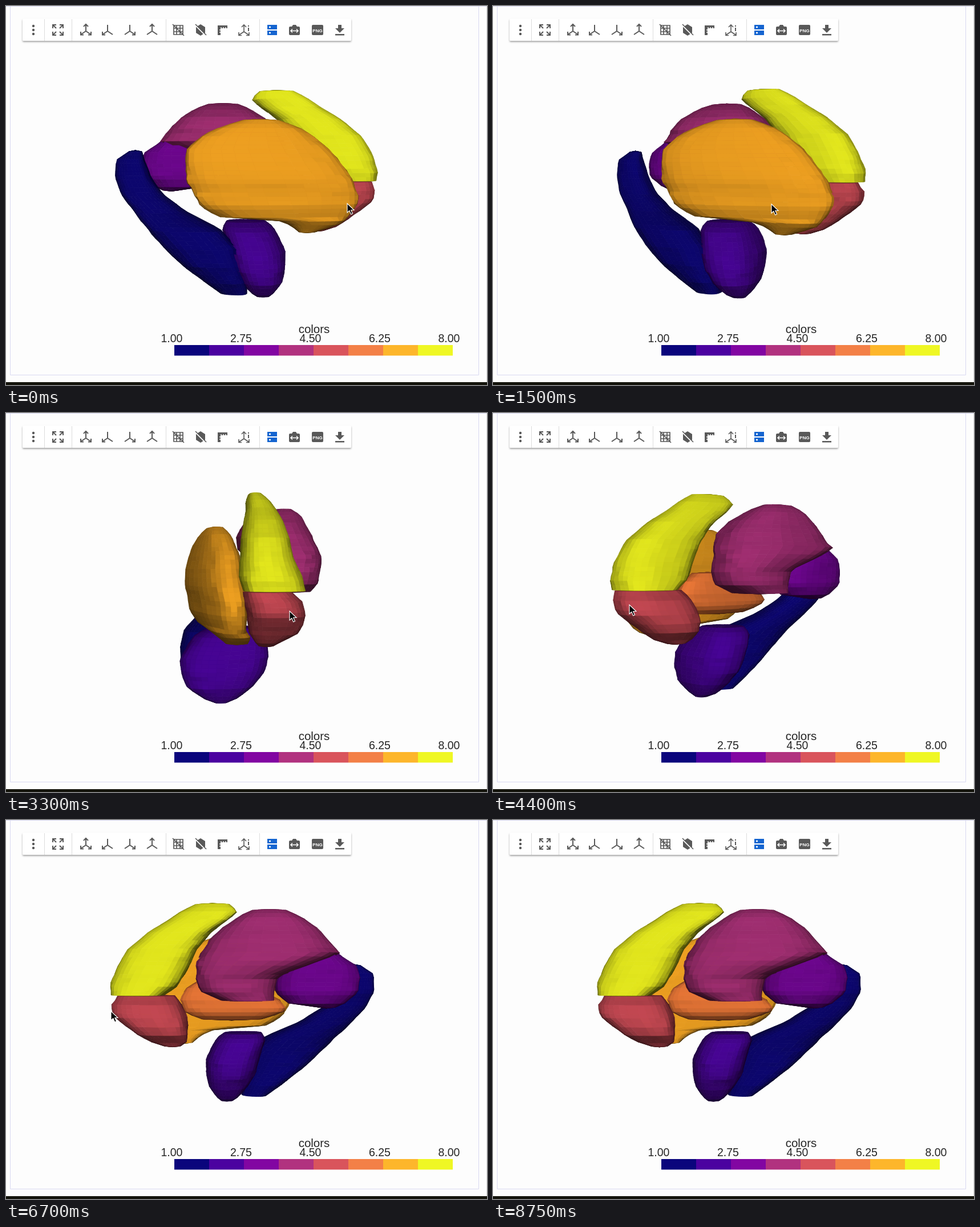
An HTML page with a canvas that plays this animation: 843x664 px, repeating every 8.8 s.

```html
<!DOCTYPE html>
<html lang="en">
<head>
<meta charset="utf-8">
<title>Rotating surface model</title>
<style>
html, body { margin: 0; width: 100%; height: 100%; overflow: hidden; background: #fdfdfd; }
svg, canvas { position: absolute; left: 0; top: 0; }
.label { font: 19.5px "Liberation Sans", Arial, sans-serif; fill: #262626; text-anchor: middle; }
.icon { fill: none; stroke: #595959; stroke-width: 2; }
.solid { fill: #595959; stroke: none; }
</style>
</head>
<body>
<svg width="843" height="664" viewBox="0 0 843 664">
  <defs>
    <filter id="shadow" x="-5%" y="-30%" width="110%" height="170%">
      <feDropShadow dx="0" dy="2" stdDeviation="1.5" flood-color="#000" flood-opacity=".35"/>
    </filter>
    <path id="axes" d="M0 2V-9M0 2L-9 8M0 2L9 8"/>
    <path id="up" d="M-4 -6L0 -10L4 -6"/>
    <path id="left" d="M-9 3V8.5H-4"/>
    <path id="right" d="M9 3V8.5H4"/>
  </defs>
  <path d="M7.5 0V646.5H828.5V0M0 .5H843" fill="none" stroke="#d9d9f2"/>
  <path d="M842.5 0V659" stroke="#e4e4e4"/>
  <rect y="659" width="843" height="5" fill="#14140c"/>

  <rect x="29" y="22" width="576" height="39" rx="2" fill="#fff" filter="url(#shadow)"/>
  <path d="M67.5 23V61M115.5 23V61M280.5 23V61M444.5 23V61" stroke="#dcdcdc"/>
  <g class="icon">
    <g class="solid" transform="translate(48 42)">
      <circle cy="-7" r="2.2"/><circle r="2.2"/><circle cy="7" r="2.2"/>
    </g>
    <path transform="translate(91 42)" d="M-9 -3V-9H-3M3 -9H9V-3M9 3V9H3M-3 9H-9V3M-8 -8L-3 -3M8 -8L3 -3M8 8L3 3M-8 8L-3 3"/>
    <g transform="translate(140 42)"><use href="#axes"/><use href="#up"/><use href="#left"/><use href="#right"/></g>
    <g transform="translate(178 42)"><use href="#axes"/><use href="#left"/></g>
    <g transform="translate(217 42)"><use href="#axes"/><use href="#right"/></g>
    <g transform="translate(256 42)"><use href="#axes"/><use href="#up"/></g>
    <path transform="translate(302 42)" stroke-width="1.7" d="M-8 -8H8V8H-8ZM-8 -3H8M-8 3H8M-3 -8V8M3 -8V8M-10 -10L10 10"/>
    <g transform="translate(341 42)">
      <path class="solid" d="M0 -10L8 -5V5L0 10L-8 5V-5Z"/>
      <path d="M-9 -8L9 10" stroke="#fff"/><path d="M-9 -10L10 9" stroke-width="1.6"/>
    </g>
    <g transform="translate(379 42)">
      <path class="solid" d="M-8 -8H9V-3H-3V9H-8Z"/>
      <path stroke="#fff" stroke-width="1.4" d="M-2 -5V-2M2 -5V-2M6 -5V-2M-5 0H-2M-5 4H-2"/>
    </g>
    <g transform="translate(417 43)" stroke-width="1.6">
      <use href="#axes"/><use href="#up"/><use href="#left"/><use href="#right"/>
      <path d="M8 -5V1M8 -9V-7" stroke-width="2"/>
    </g>
    <g transform="translate(466 42)">
      <path d="M-8 -9H9V-1H-8ZM-8 1H9V9H-8Z" fill="#1565d0" stroke="none"/>
      <path d="M-5 -5H-2M-5 5H-2" stroke="#fff" stroke-width="2.6"/>
    </g>
    <g transform="translate(505 42)">
      <path class="solid" d="M-7 -6H-4L-2 -9H3L5 -6H8Q10 -6 10 -4V7Q10 9 8 9H-7Q-9 9 -9 7V-4Q-9 -6 -7 -6Z"/>
      <path d="M-5 1.5H6M-3 -1.5L-6 1.5L-3 4.5M4 -1.5L7 1.5L4 4.5" stroke="#fff" stroke-width="1.5"/>
    </g>
    <g class="solid">
      <rect x="536" y="33" width="20" height="18" rx="2"/>
      <text x="546" y="45.5" fill="#fff" text-anchor="middle" font-family="Liberation Sans, sans-serif" font-weight="bold" font-size="8">PNG</text>
    </g>
    <path class="solid" transform="translate(585 42)" d="M-3 -9H3V-3H8L0 5L-8 -3H-3ZM-8 7H8V9.5H-8Z"/>
  </g>

  <g id="legend"><text class="label" x="540" y="573" style="font-size:20.5px">colors</text></g>
</svg>
<canvas id="view" width="843" height="664"></canvas>
<svg id="cursor" width="16" height="24" viewBox="-1 -1 16 24">
  <path d="M0 0V16L3.8 12.5L6.7 19L9.5 17.7L6.7 11.5H12Z" fill="#000" stroke="#fff" stroke-width="1.1"/>
</svg>
<script>
const LOOP = 8800, STEP = 50;
const CX = 418, CY = 323, EYE = 1207, TILT = 0.04;
const RING = 34, SLICE = 7;
const ctx = document.getElementById('view').getContext('2d');
const cursor = document.getElementById('cursor');

// time, turn in degrees, pointer x, pointer y
const track = [
  [0, 0, 598, 346], [1500, 21, 488, 347], [2300, 62, 250, 347], [2700, 62, 599, 347],
  [3300, 80, 497, 347], [4400, 142, 239, 336], [4550, 147, 215, 335], [4900, 147, 319, 335],
  [5350, 161, 258, 335], [6050, 179, 184, 335], [6900, 179, 184, 335], [7200, 178, 188, 335],
  [7500, 178, -30, 335], [8800, 178, -30, 335]
];

const mix = (a, b, f) => a.map((v, i) => v + (b[i] - v) * f);

function sample(rows, at) {
  let i = 0;
  while (i < rows.length - 2 && rows[i + 1][0] <= at) i++;
  const a = rows[i], b = rows[i + 1];
  return mix(a, b, (at - a[0]) / (b[0] - a[0]));
}

function noise(a, b, c) {
  const v = Math.sin(a * 12.99 + b * 78.23 + c * 37.7) * 43758.5;
  return v - Math.floor(v) - 0.5;
}

const round = v => Math.sign(v) * Math.abs(v) ** 0.82;
const parts = [];

// Each row is one level of the solid: y, x from, x to, z from, z to.
function solid(color, skew, rows) {
  const seed = parts.length + 1;
  const top = rows[0][0], span = rows[rows.length - 1][0] - top;
  const n = Math.round(span / SLICE);
  const rings = [];
  const addRing = ([y, x0, x1, z0, z1], j, size) => {
    const ring = [];
    for (let i = 0; i < RING; i++) {
      const t = i / RING * 2 * Math.PI;
      const r = size * (1 + 0.035 * noise(i >> 1, j >> 1, seed) + 0.012 * noise(i, j, seed));
      const x = (x1 - x0) / 2 * round(Math.cos(t)) * r;
      const z = (z1 - z0) / 2 * round(Math.sin(t)) * r;
      ring.push([(x0 + x1) / 2 + x, y, (z0 + z1) / 2 + z + skew * x]);
    }
    rings.push(ring);
  };
  const end = rows[rows.length - 1];
  addRing(rows[0].map((v, i) => i ? v : v - 2), 0, 0);
  for (let j = 0; j <= n; j++) addRing(sample(rows, top + span * j / n), j, 1);
  addRing(end.map((v, i) => i ? v : v + 2), n, 0);
  parts.push({ color, rings });
}

solid([12, 6, 108], 0.2, [
  [-68, -203, -180, -12, 8], [-53, -225, -175, -20, 20], [-23, -226, -163, -22, 28],
  [6, -214, -141, -12, 42], [34, -190, -100, 0, 62], [62, -164, -40, 15, 95],
  [90, -138, -12, 25, 105], [118, -108, -5, 28, 105], [147, -70, 3, 30, 95], [168, -41, 4, 38, 80]
]);
solid([70, 4, 146], 0, [
  [52, -32, 36, -15, 60], [62, -38, 50, -30, 85], [80, -32, 60, -36, 100], [100, -27, 68, -36, 113],
  [125, -20, 68, -30, 113], [150, -6, 63, -8, 102], [168, 10, 50, 15, 78], [176, 20, 42, 36, 57]
]);
solid([106, 6, 138], 0, [
  [-95, -145, -100, -90, -30], [-82, -160, -80, -100, -25], [-66, -185, -60, -105, -20],
  [-45, -190, -50, -105, -20], [-22, -186, -50, -105, -20], [-5, -165, -70, -95, -30],
  [2, -150, -120, -80, -45]
]);
solid([156, 45, 110], 0, [
  [-157, -68, -11, -92, -62], [-147, -92, 12, -107, -30], [-128, -120, 40, -115, -5],
  [-109, -137, 59, -124, 5], [-86, -156, 74, -134, 2], [-70, -115, 80, -136, -12],
  [-48, -52, 81, -128, -15], [-25, -47, 74, -124, -18], [-10, -47, 40, -118, -25]
]);
solid([190, 70, 80], 0.1, [
  [-15, 120, 222, -42, 33], [0, 108, 229, -58, 31], [18, 100, 227, -64, 26], [35, 98, 205, -65, 21],
  [50, 98, 185, -59, 17], [65, 100, 160, -32, 6], [71, 110, 140, -25, 0]
]);
solid([228, 116, 54], 0, [
  [-42, 20, 80, -15, 20], [-30, -10, 100, -22, 22], [-10, -60, 112, -24, 25],
  [10, -75, 108, -22, 25], [20, -50, 90, -15, 22], [26, -30, 75, -5, 15]
]);
solid([232, 156, 32], -0.1, [
  [-119, -3, 59, 45, 68], [-108, -38, 90, 38, 78], [-93, -70, 114, 34, 84], [-72, -95, 140, 30, 90],
  [-48, -98, 162, 28, 96], [-19, -93, 183, 28, 97], [4, -84, 190, 26, 92], [23, -72, 190, 26, 90],
  [41, -42, 177, 26, 80], [46, 50, 172, 24, 75], [57, 78, 159, 15, 62], [69, 92, 121, 14, 48]
]);
solid([222, 226, 28], 0.1, [
  [-174, 26, 86, -18, 3], [-162, 12, 110, -30, 8], [-147, 28, 132, -36, 11], [-126, 58, 167, -41, 20],
  [-95, 84, 204, -44, 30], [-64, 98, 222, -47, 35], [-33, 116, 233, -58, 38], [-17, 138, 230, -60, 34]
]);

function project([x, y, z], c, s) {
  const depth = x * s + z * c, across = x * c - z * s, down = y + depth * TILT;
  const k = EYE / (EYE - depth);
  return { x: across, y: down, z: depth, sx: CX + across * k, sy: CY + down * k };
}

function shade(color, p, q) {
  const nx = q.y * p.z - q.z * p.y, ny = q.z * p.x - q.x * p.z, nz = q.x * p.y - q.y * p.x;
  const light = (nz * 0.97 - ny * 0.25) / (Math.hypot(nx, ny, nz) || 1);
  const f = Math.min(1.02, 0.3 + 0.72 * Math.max(0, light));
  return `rgb(${color.map(v => Math.round(v * f)).join()})`;
}

const diff = (a, b) => ({ x: a.x - b.x, y: a.y - b.y, z: a.z - b.z });

function drawModel(turn) {
  const c = Math.cos(turn), s = Math.sin(turn), faces = [];
  for (const { color, rings } of parts) {
    const pts = rings.map(ring => ring.map(v => project(v, c, s)));
    for (let j = 0; j < pts.length - 1; j++) {
      for (let i = 0; i < RING; i++) {
        const n = (i + 1) % RING;
        const quad = [pts[j][i], pts[j][n], pts[j + 1][n], pts[j + 1][i]];
        const [A, B, C, D] = quad;
        const area = (D.sx - B.sx) * (C.sy - A.sy) - (D.sy - B.sy) * (C.sx - A.sx);
        if (area <= 0) continue;
        faces.push({ quad, z: A.z + B.z + C.z + D.z, fill: shade(color, diff(C, A), diff(D, B)) });
      }
    }
  }
  faces.sort((a, b) => a.z - b.z);
  ctx.clearRect(0, 0, 843, 664);
  ctx.lineWidth = 0.8;
  ctx.lineJoin = 'round';
  for (const { quad, fill } of faces) {
    ctx.fillStyle = ctx.strokeStyle = fill;
    ctx.beginPath();
    for (const p of quad) ctx.lineTo(p.sx, p.sy);
    ctx.closePath();
    ctx.fill();
    ctx.stroke();
  }
}

function buildLegend() {
  const legend = document.getElementById('legend');
  const add = (tag, attrs, text = '') => {
    const el = document.createElementNS('http://www.w3.org/2000/svg', tag);
    for (const key in attrs) el.setAttribute(key, attrs[key]);
    el.textContent = text;
    legend.append(el);
  };
  const bands = ['#0a057c', '#4b02a0', '#8206a2', '#b1327f', '#d9545c', '#f38047', '#fdb62b', '#eff724'];
  bands.forEach((fill, i) => add('rect', { x: 295 + i * 61, y: 594, width: 61, height: 18.5, fill }));
  for (let i = 0; i < 5; i++) {
    add('text', { class: 'label', x: 290.5 + i * 121.5, y: 589 }, (1 + i * 1.75).toFixed(2));
  }
}

let shown = -1;
function tick(now) {
  const t = Math.floor(now % LOOP / STEP) * STEP;
  if (t !== shown) {
    shown = t;
    const [, turn, x, y] = sample(track, t);
    drawModel(turn * Math.PI / 180);
    cursor.style.transform = `translate(${x - 1}px, ${y - 1}px)`;
  }
  requestAnimationFrame(tick);
}

buildLegend();
const start = performance.now();
tick(0);
requestAnimationFrame(function run() {
  tick.base = start;
});
</script>
</body>
</html>
```
